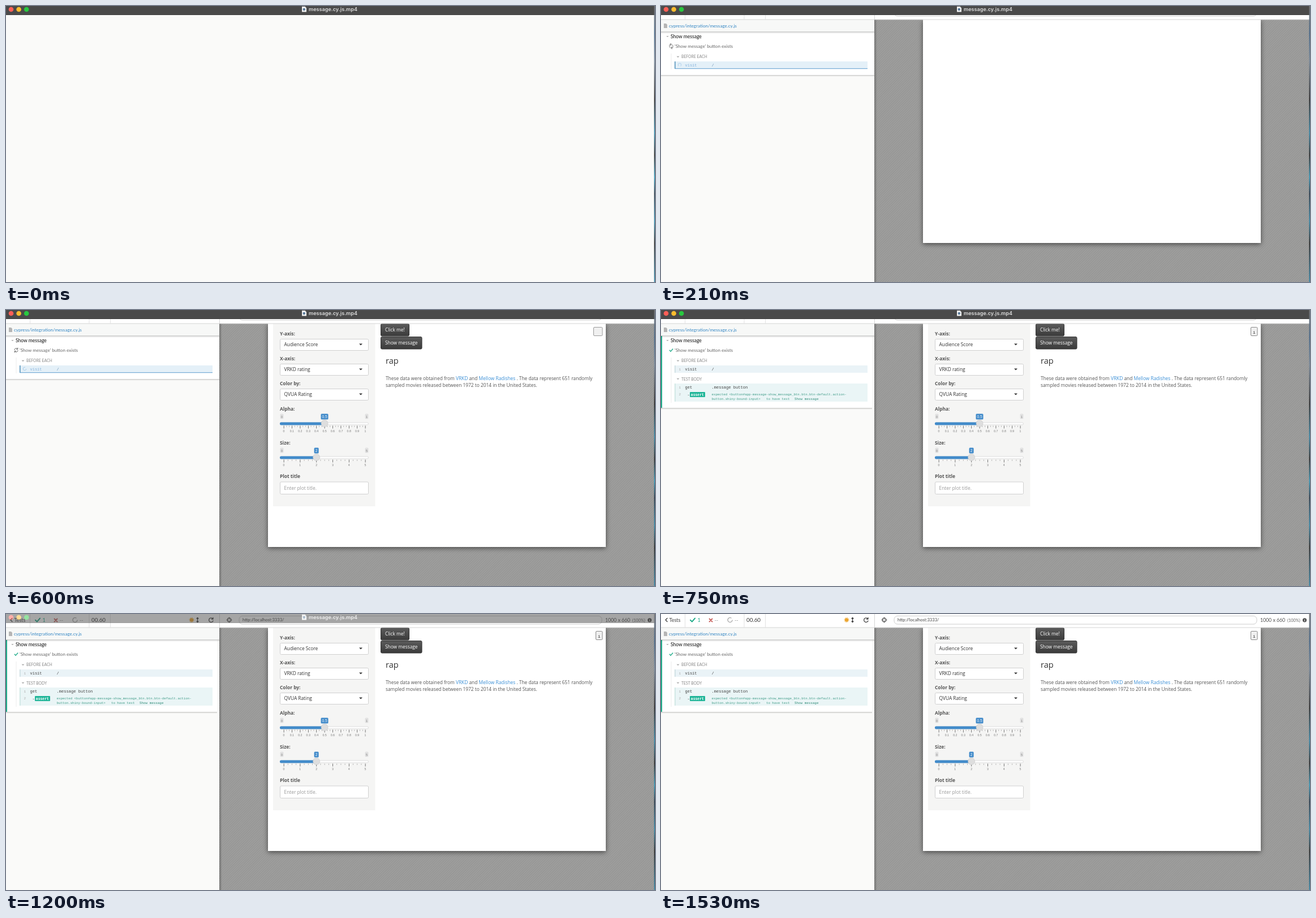
Animation, 1147 px wide and 488 px high, one loop 1800 ms. Source, as an HTML page:

```html
<!DOCTYPE html>
<html lang="en">
<head>
<meta charset="utf-8">
<title>Test run</title>
<style>
  html, body { margin: 0; width: 100%; height: 100%; overflow: hidden; background: #fafaf9; }
  svg { display: block; width: 1147px; height: 488px; }
  text { white-space: pre; }
  .lato { font-family: Lato, sans-serif; }
  .open { font-family: "Open Sans", "Noto Sans", sans-serif; }
  .sans { font-family: "Liberation Sans", sans-serif; }
  .light { font-family: Roboto, sans-serif; font-weight: 300; }
  .mono { font-family: "Liberation Mono", monospace; }
  .title { font-family: Inter, sans-serif; font-weight: 600; }
  .b { font-weight: 700; }
  .m { font-weight: 500; }
  .mid { text-anchor: middle; }
  .line { fill: none; stroke-linecap: round; stroke-linejoin: round; }
  .spin { transform-box: fill-box; transform-origin: center; }
  #page { filter: drop-shadow(0 2px 4px rgba(0, 0, 0, .55)); }
</style>
</head>
<body>
<svg id="stage" viewBox="0 0 1147 488" xmlns="http://www.w3.org/2000/svg"></svg>
<script>
const LOOP = 1800;
const LOADING = 30, RUNNING = 150, APP = 540, PASSED = 660, FADE = 1080, FADED = 1320;
const BLUE = '#428bca', GREEN = '#1fab89';

const text = (x, y, s, size, cls, fill = '#444') =>
  `<text x="${x}" y="${y}" font-size="${size}" class="${cls}" fill="${fill}">${s}</text>`;
const rect = (x, y, w, h, fill, more = '') =>
  `<rect x="${x}" y="${y}" width="${w}" height="${h}" fill="${fill}" ${more}/>`;
const dot = (x, y, r, fill, more = '') =>
  `<circle cx="${x}" cy="${y}" r="${r}" fill="${fill}" ${more}/>`;
const line = (d, stroke, width = 1, more = '') =>
  `<path class="line" d="${d}" stroke="${stroke}" stroke-width="${width}" ${more}/>`;
const shape = (d, fill) => `<path d="${d}" fill="${fill}"/>`;
const group = (id, ...parts) => `<g id="${id}">${parts.join('')}</g>`;
const repeat = (n, f) => Array.from({ length: n }, (_, i) => f(i)).join('');

const caret = (x, y, w, fill) => shape(`M${x - w} ${y - w / 2}h${2 * w}l${-w} ${w}z`, fill);
const check = (x, y, s, color) =>
  line(`M${x - s} ${y}l${s * .7} ${s * .7}l${s * 1.3} ${-s * 1.5}`, color, s * .5);
const docIcon = (x, y, fill) => shape(`M${x} ${y}h4l2 2v6h-6z`, fill);
const dividers = xs => xs.map(x => rect(x, 0, 1, 24, '#e2e2e2')).join('');

const backdrop = () => `
  <defs>
    <pattern id="stripes" width="3" height="3" patternUnits="userSpaceOnUse" patternTransform="rotate(45)">
      ${rect(0, 0, 3, 3, '#9f9f9e')}${rect(0, 0, 1.2, 3, '#949493')}
    </pattern>
    <linearGradient id="shade" x2="0" y2="1">
      <stop stop-color="#000" stop-opacity=".2"/><stop offset="1" stop-color="#000" stop-opacity="0"/>
    </linearGradient>
    <linearGradient id="side"><stop stop-color="#000" stop-opacity=".25"/><stop offset="1" stop-color="#000" stop-opacity="0"/></linearGradient>
    <linearGradient id="button" x2="0" y2="1"><stop stop-color="#5b5b5b"/><stop offset="1" stop-color="#3b3b3b"/></linearGradient>
    <linearGradient id="edge" x2="0" y2="1">
      <stop stop-color="#777"/><stop offset=".1" stop-color="#468"/><stop offset=".2" stop-color="#789"/>
      <stop offset=".34" stop-color="#222"/><stop offset=".46" stop-color="#38a"/>
      <stop offset=".54" stop-color="#222"/><stop offset=".62" stop-color="#39b"/>
      <stop offset=".68" stop-color="#234"/><stop offset=".78" stop-color="#38a"/>
      <stop offset=".86" stop-color="#222"/><stop offset="1" stop-color="#38a"/>
    </linearGradient>
  </defs>
  ${rect(0, 0, 1147, 488, '#fafaf9')}
  ${rect(377, 24, 770, 464, 'url(#stripes)')}
  ${rect(377, 24, 5, 464, 'url(#side)')}
  ${rect(463, 24, 597, 395, '#fff', 'id="page"')}`;

const pathHeader = rect(0, 24, 377, 21, '#f7f8f7') + rect(0, 45, 377, 4, 'url(#shade)');

const home = shape('M744 87L762 71L768 76.400V72H774V81.700L780 87L778 89L762 75.500L746 89z', '#333')
  + shape('M749 88.500L762 77.500L775 88.500V100H765V91H759V100H749z', '#333');

const loading = () => group('loading',
  pathHeader,
  text(14, 37.5, 'cypress/integration/message.cy.js', 7.86, 'sans', '#3386d4'),
  ['#55b39b', '#4a90cf', '#c56b62', '#eabb69', '#b5b5b5']
    .map((color, i) => dot(152 + 18 * i, 90.5, 6.2, color)).join(''),
  text(188, 128.3, 'Your tests are loading...', 11.93, 'sans mid', '#555'),
  rect(475.5, 37, 572.5, 219, '#eeeeed', 'rx="4"'),
  home,
  text(761.5, 124.500, 'This is the default blank page.', 12.6, 'light mid', '#333'),
  text(761.5, 150.800, 'To test your web application:', 12.6, 'light mid', '#333'),
  rect(696, 164, 132, 69, '#e3e3e2', 'rx="6"'),
  text(711, 187, "1. Start your app's server", 8.5, 'sans', '#333'),
  text(711, 201.300, '2.', 8.5, 'sans', '#333'),
  rect(720, 192, 50, 13, '#7e7e7e', 'rx="2"'),
  text(722, 201, 'cy.visit()', 7.65, 'mono b', '#fff'),
  text(772, 201.300, 'your app', 8.5, 'sans', '#333'),
  text(711, 215.500, '3. Begin writing tests', 8.5, 'sans', '#333'));

const testList = () => group('tests',
  pathHeader,
  docIcon(5, 31, '#b5b5b5'),
  text(14, 37.800, 'cypress/integration/message.cy.js', 8.1, 'lato', '#3386c4'),
  caret(11.5, 54, 2.2, '#aaa'),
  text(17, 56.500, 'Show message', 8.5, 'lato m', '#222'),
  text(24, 73.800, "'Show message' button exists", 8.1, 'lato', '#666'),
  caret(30, 90, 2.4, '#aaa'),
  text(36, 92.400, 'BEFORE EACH', 6.8, 'lato', '#888'));

const visit = (word, slash) =>
  text(42.5, 107, 'visit', 7, 'mono', word) + text(89.5, 107, '/', 7, 'mono', slash);

const running = () => group('running',
  rect(0, 46, 377, 76, '#fff'),
  rect(0, 122, 377, 3, 'url(#shade)'),
  rect(17.5, 84, 1, 28, '#eee'),
  rect(24, 98, 341, 13, '#e4f0f8'),
  rect(24, 98, 1.5, 13, '#4f8fb8'),
  rect(24, 110.200, 341, 1, '#5f9fd0'),
  `<g class="spin">${line('M15 70.500A3 3 0 0 1 20.500 69M20.800 67v2.300h-2.300M21 71.500A3 3 0 0 1 15.500 73M15.200 75v-2.300h2.300', '#666')}</g>`,
  `<g class="spin">${dot(33, 104, 2.8, 'none', 'stroke="#a9cdea" stroke-dasharray="14 4"')}</g>`,
  visit('#83b2dc', '#6b93b5'));

const passed = () => group('passed',
  rect(0, 46, 373, 127, '#fff'),
  rect(0, 173, 373, 3, 'url(#shade)'),
  rect(0, 46, 2, 127, GREEN),
  rect(17.5, 84, 1, 80, '#eee'),
  check(18, 71.200, 2.8, GREEN),
  rect(24, 98, 341, 13, '#eaf3f7'),
  rect(24, 98, 1.5, 13, '#c9dce0'),
  text(31.500, 106.500, '1', 6, 'mono', '#aaa'),
  visit('#444', '#444'),
  caret(30, 122, 2.4, '#aaa'),
  text(36, 124.500, 'TEST BODY', 6.8, 'lato', '#888'),
  rect(24, 130, 341, 32, '#eaf5f6'),
  rect(24, 130, 1.5, 32, '#c9e4e0'),
  text(31.500, 138.500, '1', 6, 'mono', '#aaa'),
  text(42.500, 139, 'get', 7, 'mono', '#444'),
  text(89.500, 139, '.message button', 7.1, 'mono', '#444'),
  text(31.500, 151, '2', 6, 'mono', '#aaa'),
  text(46.500, 152, '-', 7, 'mono', '#444'),
  rect(51, 145, 27, 9, '#1fb598', 'rx="1"'),
  text(52.800, 151.800, 'assert', 6.4, 'mono b', '#fff'),
  text(89.500, 151, 'expected &lt;button#app-message-show_message_btn.btn.btn-default.action-', 5.75, 'mono', '#3f9c88'),
  text(89.500, 159, 'button.shiny-bound-input&gt;', 5.75, 'mono', '#3f9c88'),
  text(186, 159, 'to have text', 5.75, 'mono', '#3f9c88'),
  text(236, 159, 'Show message', 5.9, 'mono', '#2f8c78'));

const select = (y, label, value) =>
  text(484, y + 3, label, 8.35, 'open b', '#555')
  + rect(484.5, y + 9.500, 156, 20, '#fff', 'stroke="#d0d0d0" rx="2"')
  + text(491.500, y + 22, value, 8.35, 'open', '#333')
  + caret(627, y + 19, 3, '#333');

function slider(y, label, max, value, steps, minors) {
  const knob = 491 + 144 * value / max;
  const gap = 144 / steps;
  const tag = (x, s) => rect(x - 3, y + 9, 6, 9, '#e1e1e1', 'rx="1.5"')
    + text(x, y + 16, s, 6, 'sans mid', '#888');
  const half = value % 1 ? 6.5 : 4;
  return text(484, y + 3, label, 8.35, 'open b', '#555')
    + tag(487.500, 0) + tag(637.500, max)
    + rect(knob - half, y + 9, 2 * half, 10, BLUE, 'rx="1.5"')
    + text(knob, y + 16.500, value, 6.5, 'sans mid', '#fff')
    + rect(484.500, y + 24.500, 156, 4, '#fdfdfd', 'stroke="#ddd" rx="2"')
    + rect(484, y + 24, knob - 484, 5, BLUE, 'rx="2"')
    + repeat(steps * minors + 1, i =>
        rect(490.700 + gap * i / minors, y + 30, .8, i % minors ? 2.500 : 5, i % minors ? '#aaa' : '#555'))
    + repeat(steps + 1, i =>
        text(491 + gap * i, y + 41.500, +(max * i / steps).toFixed(1), 5.2, 'sans mid', '#777'))
    + dot(knob, y + 26, 6, '#dedede', 'stroke="#c4c4c4" stroke-width=".6"');
}

const darkButton = (y, w, label) =>
  rect(662.500, y + .5, w, 21.500, 'url(#button)', 'rx="2" stroke="#333"')
  + text(670, y + 14, label, 8.35, 'open', '#fff');

const link = s => `<tspan fill="#3a8fd6">${s}</tspan>`;

const app = () => group('app',
  rect(472, 24, 180.500, 323, '#f5f5f4'),
  select(42, 'Y-axis:', 'Audience Score'),
  select(86, 'X-axis:', 'VRKD rating'),
  select(130, 'Color by:', 'QVUA Rating'),
  slider(174.500, 'Alpha:', 1, 0.5, 10, 3),
  slider(234.500, 'Size:', 5, 2, 5, 4),
  text(484, 297, 'Plot title', 8.35, 'open b', '#555'),
  rect(484.500, 304, 156, 21.500, '#fff', 'stroke="#d0d0d0" rx="2"'),
  text(491.500, 318, 'Enter plot title.', 8.35, 'open', '#999'),
  darkButton(24, 50, 'Click me!'),
  darkButton(47, 72.500, 'Show message'),
  text(671, 95, 'rap', 14.6, 'open', '#333'),
  text(671, 124.300, `These data were obtained from ${link('VRKD')} and ${link('Mellow Radishes')} . The data represent 651 randomly`, 8.35, 'open', '#555'),
  text(671, 136.300, 'sampled movies released between 1972 to 2014 in the United States.', 8.35, 'open', '#555'));

const infoBlank = () => group('infoBlank',
  rect(1038.500, 30.500, 15.500, 15, '#f0f0f0', 'stroke="#999" rx="1.5"'));
const infoReady = () => group('infoReady',
  rect(1042.500, 30.500, 11.500, 15, '#f0f0f0', 'stroke="#888" rx="1.5"'),
  text(1048.200, 41.500, 'i', 8, 'mono mid', '#333'));

const toolbar = () => group('toolbar',
  rect(0, 0, 1147, 24, '#fff'),
  rect(0, 23.500, 1147, 1, '#d4d4d4'),
  rect(377, 0, 1, 24, '#d4d4d4'),
  group('loadBars', dividers([23, 104, 124])),
  group('runBars', dividers([42, 146.500, 184])),
  group('status',
    line('M11 7.500l-3 3l3 3', '#444', 1.400),
    text(14.500, 13.700, 'Tests', 9, 'lato', '#444'),
    check(56, 10.800, 4, GREEN), text(64.500, 14, '1', 9, 'lato', GREEN),
    line('M85.500 8.500l5 5m0 -5l-5 5', '#c8605c', 1.800), text(94.500, 13.500, '--', 9, 'lato', '#999'),
    dot(122, 10.500, 4, 'none', 'stroke="#999" stroke-width="1.200" stroke-dasharray="21 4"'),
    text(130, 13.500, '--', 9, 'lato', '#999'),
    text(151, 14, '00.60', 9.8, 'lato m', '#444'),
    dot(328, 10.500, 3.200, '#eba52f'),
    dot(328, 10.500, 4, 'none', 'stroke="#eba52f" stroke-dasharray="1.500 1.640"'),
    line('M338.500 7v7M337 8l1.500 -1.500l1.500 1.500M337 13l1.500 1.500l1.500 -1.500', '#333', 1.200),
    line('M365.300 8.200A3.800 3.800 0 1 0 366 12M366 6.500v2.500h-2.700', '#444', 1.300),
    dot(394.500, 10.500, 3.300, 'none', 'stroke="#555" stroke-width="1.200"'),
    line('M394.500 6v3m0 3v3m-4.500 -4.500h3m3 0h3', '#555'),
    rect(412, 3.500, 641, 14.500, '#fff', 'stroke="#ccc" rx="6"'),
    text(418, 13.400, 'http://localhost:3333/', 7.6, 'lato', '#444'),
    text(1059, 13.800, '1000 x 660', 8.7, 'lato', '#555'),
    text(1107, 13.500, '(100%)', 7.4, 'lato', '#666'),
    dot(1137.500, 10.800, 3.600, '#555'),
    text(1137.500, 13, 'i', 6, 'sans b mid', '#fff')));

const blank = () => group('blank', rect(0, 0, 1147, 488, '#fafaf9'));

const titleBar = () => group('titleBar',
  rect(0, 0, 1147, 16, '#4a4a4a'),
  rect(0, 15, 1147, 1, '#3f3f3f'),
  ['#ff5f57', '#febc2e', '#28c840'].map((color, i) => dot(9 + 13.600 * i, 6, 4.300, color)).join(''),
  shape('M523 1h5.500l2.500 2.500v7h-8z', '#f0f0f0'),
  dot(526.800, 6, 2.200, '#5c7c9c'),
  text(535, 9.300, 'message.cy.js.mp4', 9.1, 'title', '#dedede'));

document.getElementById('stage').innerHTML = [
  backdrop(), loading(), running(), passed(), testList(), app(), infoBlank(), infoReady(),
  toolbar(), blank(), titleBar(), rect(1145.500, 0, 1.500, 488, 'url(#edge)'),
].join('');

const forever = { duration: LOOP, iterations: Infinity };

function show(id, from, to = LOOP) {
  const step = (time, opacity) => ({ offset: time / LOOP, opacity, easing: 'step-end' });
  const steps = from ? [step(0, 0), step(from, 1)] : [step(0, 1)];
  steps.push(...(to < LOOP ? [step(to, 0), step(LOOP, 0)] : [step(LOOP, 1)]));
  document.getElementById(id).animate(steps, forever);
}

show('blank', 0, LOADING);
show('loading', LOADING, RUNNING);
show('loadBars', LOADING, RUNNING);
show('runBars', RUNNING);
show('tests', RUNNING);
show('running', RUNNING, PASSED);
show('passed', PASSED);
show('app', APP);
show('infoBlank', APP, PASSED);
show('infoReady', PASSED);
show('status', RUNNING);

document.getElementById('titleBar').animate([
  { offset: 0, opacity: 1 },
  { offset: FADE / LOOP, opacity: 1 },
  { offset: FADED / LOOP, opacity: 0 },
  { offset: 1, opacity: 0 },
], forever);

for (const icon of document.querySelectorAll('.spin')) {
  icon.animate([{ transform: 'rotate(0)' }, { transform: 'rotate(360deg)' }],
    { duration: LOOP / 3, iterations: Infinity });
}
</script>
</body>
</html>
```
